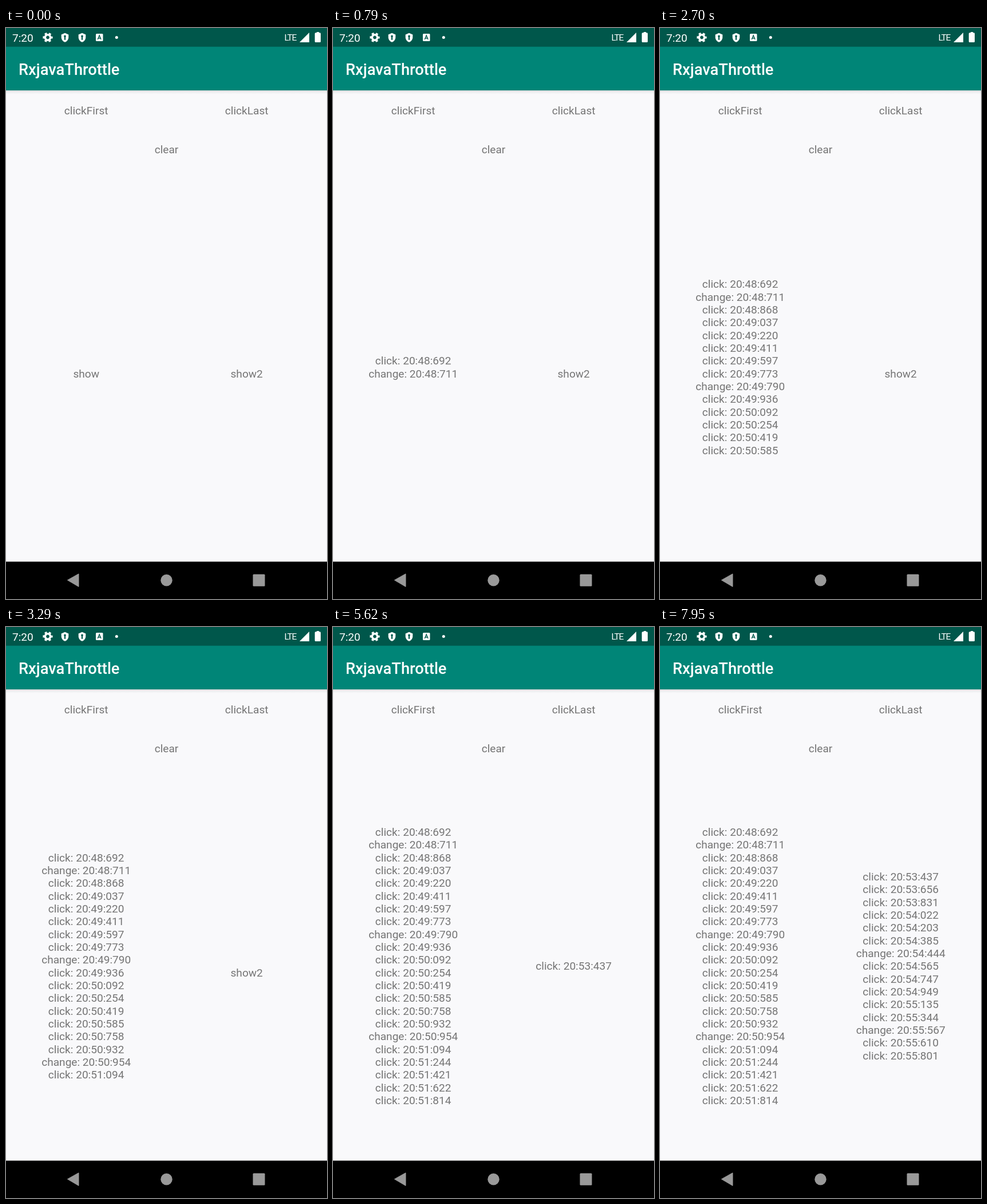
Recreate the animation shown at these times as an HTML page. Size 561 by 998 pixels, loop 8000 ms.

```html
<!DOCTYPE html>
<html lang="en">
<head>
<meta charset="utf-8">
<title>RxjavaThrottle</title>
<style>
  html, body { margin: 0; width: 100%; height: 100%; overflow: hidden; background: #f9f9fb; }
  svg { display: block; width: 100vw; height: 100vh; }
  text { font-family: Roboto, sans-serif; font-size: 19.1px; }
  .body { fill: #757575; text-anchor: middle; }
  .title { font-size: 27.3px; font-weight: 500; }
  .network { font-size: 15.5px; letter-spacing: -1.2px; }
</style>
</head>
<body>
<svg viewBox="0 0 561 998" preserveAspectRatio="none">
  <defs>
    <linearGradient id="shadow" x2="0" y2="1">
      <stop offset="0" stop-color="#000" stop-opacity=".14"/>
      <stop offset=".4" stop-color="#000" stop-opacity=".04"/>
      <stop offset="1" stop-color="#000" stop-opacity="0"/>
    </linearGradient>
    <g id="shield">
      <path fill="#fff" d="M0-8 6.3-5.2V-.8C6.3 3.4 3.7 6.8 0 8-3.7 6.8-6.3 3.4-6.3-.8V-5.2Z"/>
      <circle cy="-2.4" r="1.8" fill="#00574b"/>
      <path fill="#00574b" d="M-1.1-1.5H1.1V4H-1.1Z"/>
    </g>
  </defs>

  <rect width="561" height="998" fill="#f9f9fb"/>
  <rect y="109" width="561" height="7" fill="url(#shadow)"/>
  <rect width="561" height="109" fill="#008577"/>
  <rect width="561" height="32.7" fill="#00574b"/>

  <g fill="#fff">
    <text x="11" y="23.6">7:20</text>
    <g transform="translate(73 16.5)">
      <circle r="4.7" fill="none" stroke="#fff" stroke-width="3.6"/>
      <circle r="7.3" fill="none" stroke="#fff" stroke-width="2.6" stroke-dasharray="4 3.645" stroke-dashoffset="2"/>
    </g>
    <use href="#shield" x="103" y="16.8"/>
    <use href="#shield" x="133" y="16.8"/>
    <rect x="157" y="10" width="12.5" height="13" rx="1.5"/>
    <path d="M160.3 20 163.2 12.8 166.1 20M161.3 17.8H165.1" fill="none" stroke="#00574b" stroke-width="1.4"/>
    <circle cx="193.3" cy="16.5" r="2.5"/>
    <text class="network" x="486.5" y="22">LTE</text>
    <path d="M513 25 530 8V25Z"/>
    <path d="M542 8.2H543V7H547V8.2H548.5Q550 8.2 550 9.7V23.5Q550 25 548.5 25H541.2Q539.7 25 539.7 23.5V9.7Q539.7 8.2 541.2 8.2Z"/>
    <text class="title" x="22" y="81.5">RxjavaThrottle</text>
  </g>

  <g class="body">
    <text x="140.2" y="150.8">clickFirst</text>
    <text x="420.7" y="150.8">clickLast</text>
    <text x="280.5" y="218.8">clear</text>
    <g id="first"></g>
    <g id="last"></g>
  </g>

  <rect y="932.7" width="561" height="66"/>
  <g fill="#999">
    <path d="M107.5 965 127 954V976.5Z" stroke="#999" stroke-linejoin="round"/>
    <circle cx="280.5" cy="965.2" r="10.2"/>
    <rect x="431.5" y="954.8" width="21" height="21" rx="1.5"/>
  </g>
</svg>
<script>
  const LOOP = 8000, LINE = 22.34, BASELINE = 610.6;

  // Stamps are clock times in ms past the hour's 20th minute; start is the clock at time 0.
  const logs = [
    {
      id: 'first', x: 140.2, hint: 'show', start: 47925,
      click: [48692, 48868, 49037, 49220, 49411, 49597, 49773, 49936, 50092, 50254,
        50419, 50585, 50758, 50932, 51094, 51244, 51421, 51622, 51814],
      change: [48711, 49790, 50954]
    },
    {
      id: 'last', x: 420.7, hint: 'show2', start: 47860,
      click: [53437, 53656, 53831, 54022, 54203, 54385, 54565, 54747, 54949, 55135,
        55344, 55610, 55801],
      change: [54444, 55567]
    }
  ];

  const stampText = ms => `20:${Math.floor(ms / 1000)}:${String(ms % 1000).padStart(3, '0')}`;

  for (const log of logs) {
    const entries = kind => log[kind].map(ms => ({ at: ms - log.start, text: `${kind}: ${stampText(ms)}` }));
    log.entries = [...entries('click'), ...entries('change')].sort((a, b) => a.at - b.at);
    log.node = document.getElementById(log.id);
    log.count = -1;
  }

  function draw(log, time) {
    const count = log.entries.filter(entry => entry.at <= time).length;
    if (count === log.count) return;
    log.count = count;
    const lines = count ? log.entries.slice(0, count).map(entry => entry.text) : [log.hint];
    // Every entry ends in a line break, so the centred block has one empty last line.
    const top = BASELINE - count / 2 * LINE;
    log.node.innerHTML = lines
      .map((line, i) => `<text x="${log.x}" y="${top + i * LINE}">${line}</text>`)
      .join('');
  }

  const origin = performance.now();
  function frame() {
    const time = (performance.now() - origin) % LOOP;
    logs.forEach(log => draw(log, time));
    requestAnimationFrame(frame);
  }
  frame();
</script>
</body>
</html>
```
